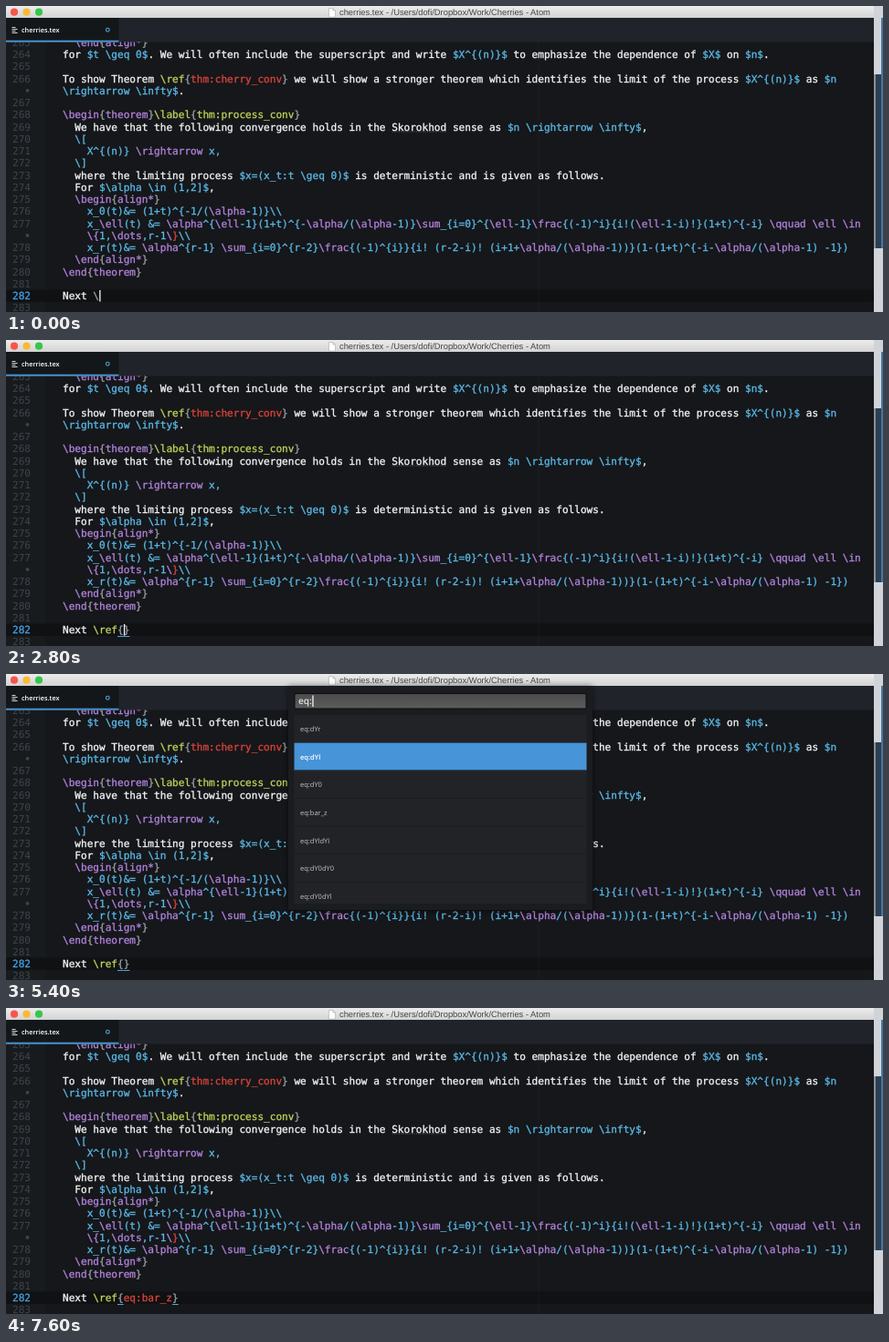
An HTML page that plays this animation: 960x336 px, repeating every 7800 ms.

```html
<!DOCTYPE html>
<html lang="en">
<head>
<meta charset="utf-8">
<title>Label completion</title>
<style>
  html, body { margin: 0; width: 100%; height: 100%; overflow: hidden; background: #15171a; }
  svg { display: block; width: 100vw; height: 100vh; }
  text { text-rendering: geometricPrecision; }
  .code { font: 11.08px "DejaVu Sans Mono", "Noto Sans Mono", monospace; }
  .code.text { stroke-width: .32px; }
  .ui { font: 7.5px "Open Sans", "Noto Sans", sans-serif; }
  .title { font: 9.36px "Liberation Sans", Arial, sans-serif; }
  .input { font: 600 10px "Open Sans", "Noto Sans", sans-serif; }
</style>
</head>
<body>
<svg id="stage" viewBox="0 0 960 336" xmlns="http://www.w3.org/2000/svg">
  <defs>
    <linearGradient id="bar" x2="0" y2="1">
      <stop stop-color="#ececec"/><stop offset="1" stop-color="#d3d3d3"/>
    </linearGradient>
    <linearGradient id="field" x2="0" y2="1">
      <stop stop-color="#4b4b4b"/><stop offset="1" stop-color="#5c5c5c"/>
    </linearGradient>
    <filter id="blur" x="-10%" y="-10%" width="120%" height="120%"><feGaussianBlur stdDeviation="3"/></filter>
    <clipPath id="listClip"><rect x="315" y="45" width="321" height="207"/></clipPath>
  </defs>

  <rect width="960" height="336" fill="#15171a"/>
  <rect width="43" height="336" fill="#181b1e"/>
  <rect y="311.5" width="950" height="13.3" fill="#0f1113"/>
  <path d="M583 40V336" stroke="#fff" stroke-opacity=".03"/>
  <g id="code"></g>
  <path d="M422.5 138H482" stroke="#8a6a6a" stroke-width=".7" stroke-dasharray="1.2 1.2"/>
  <g id="typed"></g>
  <path id="braces" stroke="#4fa8dc" stroke-width="1"/>
  <rect id="caret" y="312" width="1.3" height="12.6" fill="#f5f5f5"/>

  <!-- tabs -->
  <rect y="13" width="950" height="26.5" fill="#20242a"/>
  <rect y="13" width="123.5" height="26.5" fill="#14171a"/>
  <rect y="37.7" width="123.5" height="2" fill="#4795cf"/>
  <path d="M6.5 23.5h4M6.5 25.5h6M6.5 27.5h4M6.5 29.5h6" stroke="#d7dadd"/>
  <text class="ui" x="17" y="29" fill="#fff" style="font-weight:600;font-size:7.3px">cherries.tex</text>
  <circle cx="111.3" cy="26.2" r="1.9" fill="none" stroke="#4a9fd8" stroke-width="1.1"/>

  <!-- title bar -->
  <rect width="950" height="13" fill="url(#bar)"/>
  <circle cx="9" cy="6.7" r="4.1" fill="#f9544d"/>
  <circle cx="22.5" cy="6.7" r="4.1" fill="#fbb935"/>
  <circle cx="36" cy="6.7" r="4.1" fill="#35c649"/>
  <path d="M353.5 2.5h4.5l2.5 2.5v7h-7zM358 2.5v2.5h2.5" fill="#fff" stroke="#b4b4b4" stroke-width=".7"/>
  <text class="title" x="365" y="10.2" fill="#454545">cherries.tex - /Users/dofi/Dropbox/Work/Cherries - Atom</text>

  <!-- windows behind -->
  <rect x="950" width="10" height="336" fill="#d0d4d8"/>
  <rect x="951.5" y="75" width="8.5" height="191" fill="#2b3f53"/>
  <rect x="950" y="75" width="1.5" height="191" fill="#8d949b"/>
  <rect x="958" y="13" width="2" height="253" fill="#4876a2"/>

  <!-- chooser -->
  <g id="panel">
    <rect x="309" y="14" width="333" height="246" fill="#000" opacity=".6" filter="url(#blur)"/>
    <rect x="309" y="14" width="333" height="245" fill="#1b1c1f"/>
    <rect x="316" y="21.5" width="319" height="16.5" fill="url(#field)" stroke="#0c0c0d"/>
    <text id="query" class="input" x="320" y="33" fill="#e6e6e6"></text>
    <rect id="queryCaret" y="23.5" width="1.2" height="12.5" fill="#fff"/>
    <g clip-path="url(#listClip)">
      <rect x="315.5" y="45" width="320" height="207" fill="#222326"/>
      <g id="list"></g>
    </g>
  </g>
</svg>
<script>
const LOOP = 7800, LEFT = 62, CHAR = 6.67, TOP = 57, ROW = 13.26, ITEM = 30.6;
const INK = {
  w: '#f3f5f5', b: '#5bb8e6', p: '#b182dc', y: '#c2d158',
  r: '#d8433b', g: '#9aa0a6', n: '#3e444b', c: '#459fe0'
};
const raw = String.raw;
const $ = id => document.getElementById(id);

function add(parent, tag, attrs, content = '') {
  const node = document.createElementNS('http://www.w3.org/2000/svg', tag);
  for (const k in attrs) node.setAttribute(k, attrs[k]);
  node.textContent = content;
  parent.append(node);
  return node;
}

// Each run begins with its ink key; "m" is math with commands picked out.
function runs(line) {
  return line.split('|').flatMap(run => {
    const key = run[0], text = run.slice(1);
    if (key !== 'm') return [[key, text]];
    return text.split(/(\\[a-z]+)/).map((s, i) => [i % 2 ? 'p' : 'b', s]);
  });
}

function drawLine(parent, line, row) {
  let col = 0;
  for (const [key, text] of runs(line)) {
    for (const word of text.matchAll(/\S+/g)) {
      add(parent, 'text', {
        class: 'code text', x: LEFT + (col + word.index) * CHAR, y: TOP + row * ROW,
        fill: INK[key], stroke: INK[key]
      }, word[0]);
    }
    col += text.length;
  }
}

// Line number first, "-" for a soft-wrapped row.
const doc = [
  ['263', raw`p  \end|g{|palign*|g}`],
  ['264', raw`wfor |b$t \geq 0$|w. We will often include the superscript and write |b$X^{(n)}$|w to emphasize the dependence of |b$X$|w on |b$n$|w.`],
  ['265', 'w'],
  ['266', raw`wTo show Theorem |y\ref|g{|rthm:cherry_conv|g}|w we will show a stronger theorem which identifies the limit of the process |b$X^{(n)}$|w as |b$n`],
  ['-', raw`b\rightarrow \infty$|w.`],
  ['267', 'w'],
  ['268', raw`p\begin|g{|ptheorem|g}|y\label|g{|ythm:process_conv|g}`],
  ['269', raw`w  We have that the following convergence holds in the Skorokhod sense as |b$n \rightarrow \infty$|w,`],
  ['270', raw`b  \[`],
  ['271', raw`m    X^{(n)} \rightarrow x,`],
  ['272', raw`b  \]`],
  ['273', raw`w  where the limiting process |b$x=(x_t:t \geq 0)$|w is deterministic and is given as follows.`],
  ['274', raw`w  For |b$\alpha \in (1,2]$|w,`],
  ['275', raw`p  \begin|g{|palign*|g}`],
  ['276', raw`m    x_0(t)&= (1+t)^{-1/(\alpha-1)}\\`],
  ['277', raw`m    x_\ell(t) &= \alpha^{\ell-1}(1+t)^{-\alpha/(\alpha-1)}\sum_{i=0}^{\ell-1}\frac{(-1)^i}{i!(\ell-1-i)!}(1+t)^{-i} \qquad \ell \in`],
  ['-', raw`p    \{|m1,\dots,r-1|p\|r}|b\\`],
  ['278', raw`m    x_r(t)&= \alpha^{r-1} \sum_{i=0}^{r-2}\frac{(-1)^{i}}{i! (r-2-i)! (i+1+\alpha/(\alpha-1))}(1-(1+t)^{-i-\alpha/(\alpha-1) -1})`],
  ['279', raw`p  \end|g{|palign*|g}`],
  ['280', raw`p\end|g{|ptheorem|g}`],
  ['281', 'w'],
  ['282', 'wNext'],
  ['283', 'w']
];
doc.forEach(([number, line], i) => {
  const row = i - 1, y = TOP + row * ROW;
  if (number === '-') add($('code'), 'circle', { cx: 23.5, cy: y - 4, r: 1.9, fill: INK.n });
  else add($('code'), 'text', {
    class: 'code', x: 7, y, fill: number === '282' ? INK.c : INK.n,
    stroke: number === '282' ? INK.c : 'none', 'stroke-width': .35
  }, number);
  drawLine($('code'), line, row);
});

const labels = [
  ['eq:regular_vary', 'fig:pronged_caterpillar', 'thm:cherry_conv', 'eq:pre_aim', 'lemma:zeta', 'lemma:first_moment', 'lemma:second_moment'],
  ['eq:dYr', 'eq:dYl', 'eq:dY0', 'eq:bar_z', 'eq:dYldYl', 'eq:dY0dY0', 'eq:dY0dYl']
];
const items = labels[0].map((_, i) => {
  const y = 45 + i * ITEM;
  const box = add($('list'), 'rect', { x: 315.5, y, width: 320, height: ITEM });
  add($('list'), 'rect', { x: 315.5, y: y + ITEM - .8, width: 320, height: .8, fill: '#18191b' });
  return { box, text: add($('list'), 'text', { class: 'ui', x: 322, y: y + 18.2 }) };
});

// [start, value] steps
const tracks = {
  typed: [[0, 'g\\'], [1400, 'p\\r'], [1600, 'p\\re'], [1800, 'y\\ref'], [2200, 'y\\ref|g{}'],
          [7400, 'y\\ref|g{|req:bar_z|g}']],
  caret: [[0, 1], [800, 0], [1200, 1], [3000, 0], [7400, 1], [7600, 0]],
  open: [[0, 0], [3000, 1], [7400, 0]],
  query: [[0, ''], [4000, 'e'], [4200, 'eq'], [4600, 'eq:']],
  pick: [[0, 0], [5200, 1], [5800, 2], [6200, 3]],
  queryCaret: [[0, 1], [3800, 0], [4000, 1], [5000, 0], [5200, 1], [5600, 0], [6000, 1], [6600, 0], [7000, 1]]
};
const at = (track, t) => track.findLast(step => step[0] <= t)[1];
const show = (node, on) => node.setAttribute('visibility', on ? 'inherit' : 'hidden');
const column = n => LEFT + n * CHAR;

let last = '';
function render(t) {
  const s = {};
  for (const k in tracks) s[k] = at(tracks[k], t);
  const key = JSON.stringify(s);
  if (key === last) return;
  last = key;

  $('typed').replaceChildren();
  drawLine($('typed'), 'w     |' + s.typed, 20);
  const length = 5 + runs(s.typed).reduce((n, run) => n + run[1].length, 0);
  const closed = s.typed.includes('{');
  $('braces').setAttribute('d', closed
    ? `M${column(9)} 325.5h${CHAR}M${column(length - 1)} 325.5h${CHAR}` : '');
  $('caret').setAttribute('x', column(closed && length < 12 ? 10 : length) + .2);
  show($('caret'), s.caret);

  show($('panel'), s.open);
  $('query').textContent = s.query;
  const end = s.query ? $('query').getComputedTextLength() + .6 : 0;
  $('queryCaret').setAttribute('x', 320 + end);
  show($('queryCaret'), s.queryCaret);
  items.forEach(({ box, text }, i) => {
    const on = i === s.pick;
    box.setAttribute('fill', on ? '#4794d8' : '#222326');
    text.textContent = labels[s.query ? 1 : 0][i];
    text.setAttribute('fill', on ? '#fff' : '#c2c5c8');
    text.style.fontWeight = on ? 600 : 400;
  });
}

const start = performance.now();
function tick() {
  render((performance.now() - start) % LOOP);
  requestAnimationFrame(tick);
}
tick();
</script>
</body>
</html>
```
